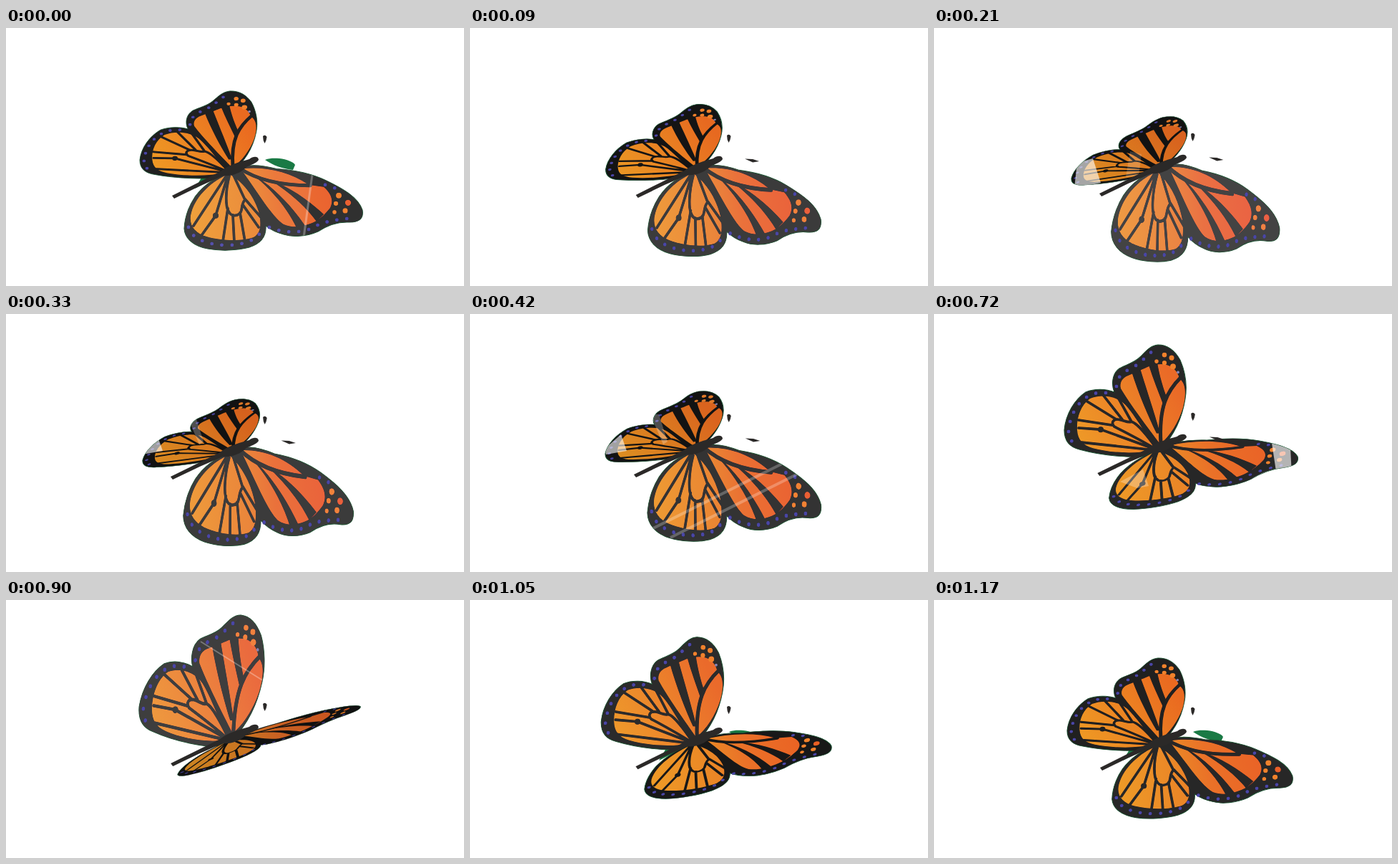
Animation of 640 by 360 pixels, one loop 1200 ms. Source, as an HTML page:

```html
<!DOCTYPE html>
<html lang="en">
<head>
<meta charset="utf-8">
<title>Butterfly</title>
<style>
  html, body { margin: 0; width: 100%; height: 100%; overflow: hidden; background: #fff; }
  svg { display: block; width: 100vw; height: 100vh; }
  .edge { fill: #141413; stroke: #14502f; stroke-width: 1; }
  .vein { fill: none; stroke: #141413; stroke-width: 3.6; stroke-linecap: round; stroke-linejoin: round; }
  .thick { stroke-width: 5; }
  .wedge { fill: #141413; }
  .dots { fill: none; stroke: #4a46a6; stroke-width: 5; stroke-linecap: round; stroke-dasharray: 0 14; }
  .spots { fill: #f0822c; }
  .sheen { mix-blend-mode: lighten; }
  .glints path { fill: #fff; }
  .glints .line { fill: none; stroke: #fff; }
</style>
</head>
<body>
<svg viewBox="0 0 640 360">
  <defs>
    <linearGradient id="warmR" gradientUnits="userSpaceOnUse" x1="260" y1="270" x2="450" y2="240">
      <stop offset="0" stop-color="#ee9a26"/>
      <stop offset=".45" stop-color="#ea8526"/>
      <stop offset=".65" stop-color="#ea7128"/>
      <stop offset="1" stop-color="#ea6424"/>
    </linearGradient>
    <linearGradient id="warmL" gradientUnits="userSpaceOnUse" x1="200" y1="165" x2="335" y2="95">
      <stop offset="0" stop-color="#ee9824"/>
      <stop offset=".5" stop-color="#ec8322"/>
      <stop offset="1" stop-color="#ea6a20"/>
    </linearGradient>
    <path id="shapeL" d="M318 187C332 172 346 150 351 118C354 100 351 80 344 64C336 50 326 43 313 43C302 44 296 52 288 60C280 68 268 71 259 76C248 84 248 100 252 109C240 104 224 104 212 109C196 120 184 140 182 162C182 178 190 186 204 189C230 196 260 199 286 199C300 198 310 193 318 187Z"/>
    <path id="shapeR" d="M312 203C330 190 350 190 378 197C410 199 432 206 447 213C470 224 492 236 498 254C500 266 494 271 480 271C462 270 448 276 436 284C420 291 400 292 388 288C376 285 368 280 363 276C364 290 358 300 340 306C322 311 298 311 282 308C262 304 250 294 249 280C250 262 256 248 264 236C276 220 290 210 312 203Z"/>
    <clipPath id="clipL"><use href="#shapeL" class="moveL"/></clipPath>
    <clipPath id="clipR"><use href="#shapeR" class="moveR"/></clipPath>
  </defs>

  <g id="fringe" fill="#1a7a45">
    <path d="M362 184C370 181 376 182 382 182C392 183 402 187 404 191L401 198C385 196 374 192 362 184Z"/>
    <path d="M264 224L273 209L306 203Z"/>
  </g>

  <g class="moveL">
    <use href="#shapeL" class="edge"/>
    <g fill="url(#warmL)">
      <path d="M316 181C300 160 274 126 261 104C259 96 263 89 271 86C282 81 292 77 298 74C308 70 318 69 326 71C337 74 342 84 343 90C352 96 353 112 348 130C342 150 330 170 316 181Z"/>
      <path d="M310 189C298 170 280 140 268 127C254 113 232 112 218 118C204 128 199 146 200 162C201 176 208 183 222 187C245 193 280 196 310 189Z"/>
    </g>
    <path class="wedge" d="M276 80L288 76C298 108 310 144 316 166L311 166C300 144 286 112 276 80ZM300 71L312 68C315 86 321 106 326 118L321 128C314 110 306 90 300 71Z"/>
    <path class="vein thick" d="M345 88C325 108 314 130 317 180"/>
    <path class="vein" d="M308 187C290 176 262 162 252 157C247 152 250 146 258 147C266 148 270 152 276 150C284 152 300 172 310 186M250 155L202 148M255 147L214 122M263 147L237 114M276 150L258 118M306 187L233 161L202 159M304 189L206 179"/>
    <circle cx="233" cy="161" r="4" fill="#141413"/>
    <path class="dots" d="M240 110C214 106 190 130 188 165Q190 178 199 184"/>
    <path class="dots" d="M255 101C256 84 268 80 280 73C294 66 298 52 314 49"/>
    <g class="spots">
      <circle cx="322" cy="57" r="3.4"/><circle cx="311" cy="66" r="2.8"/>
      <circle cx="322" cy="68" r="3.2"/><circle cx="334" cy="73" r="4"/>
      <circle cx="332" cy="61" r="3.6"/><circle cx="341" cy="81" r="2" fill="#8884b4"/>
    </g>
    <use href="#shapeL" class="sheen"/>
    <use href="#shapeL" class="shade"/>
  </g>

  <g class="moveR">
    <use href="#shapeR" class="edge"/>
    <g fill="url(#warmR)">
      <path d="M328 197C360 193 395 200 423 219L444 222C455 232 458 241 453 251C446 260 438 268 428 272C416 277 402 280 388 274C372 264 352 230 328 197Z"/>
      <path d="M312 204C286 214 262 238 258 262C256 276 264 286 280 291C300 297 330 298 346 292C357 286 357 272 353 256C347 238 335 218 312 204Z"/>
    </g>
    <path class="wedge" d="M342 203C372 220 398 247 418 276L407 281C394 252 368 222 342 203ZM368 212C400 224 424 242 444 260L434 270C418 248 394 228 368 212Z"/>
    <path class="vein thick" d="M326 196C350 212 385 220 425 220"/>
    <path class="vein" d="M309 205L262 276M310 206L293 262L272 291M312 207C306 230 307 250 311 256C314 262 320 264 327 259C331 254 328 246 334 240L318 206M310 252L303 298M317 261L319 299M327 258L334 298M331 247L353 278M334 239L356 264"/>
    <circle cx="293" cy="262" r="4" fill="#141413"/>
    <path class="dots" d="M255 278C258 292 278 302 306 303C332 303 352 296 357 282"/>
    <path class="dots" d="M368 278C390 287 414 286 430 278C446 268 466 268 489 264"/>
    <path class="dots" d="M446 219L461 224"/>
    <g class="spots">
      <circle cx="465" cy="234" r="4"/><circle cx="478" cy="244" r="4.2" fill="#ea6024"/>
      <circle cx="461" cy="245" r="3.2"/><circle cx="474" cy="255" r="3.6"/>
      <circle cx="459" cy="257" r="2.8"/>
    </g>
    <use href="#shapeR" class="sheen"/>
    <use href="#shapeR" class="shade"/>
  </g>

  <g class="glints" clip-path="url(#clipL)">
    <path data-on="150 330" opacity=".62" d="M200 188L222 182L233 216L196 224Z"/>
    <path data-on="150 330" opacity=".16" d="M274 172L290 176L286 206L268 208Z"/>
    <path data-on="330 480" opacity=".6" d="M188 188L211 168L219 191L190 196Z"/>
    <path data-on="330 480" opacity=".25" d="M252 140L264 140L276 178L270 182Z"/>
    <path data-on="840 960" opacity=".3" class="line" stroke-width="2" d="M272 58L360 113"/>
  </g>
  <g class="glints" clip-path="url(#clipR)">
    <path data-on="0 90" opacity=".28" class="line" stroke-width="3" d="M428 205L416 292"/>
    <path data-on="0 90" opacity=".06" d="M240 180H430L416 320H240Z"/>
    <path data-on="360 480" opacity=".25" class="line" stroke-width="4" d="M250 302L440 207M280 312L460 222"/>
    <path data-on="510 600" opacity=".25" class="line" stroke-width="4" d="M406 186L394 284"/>
    <path data-on="660 780" opacity=".65" d="M472 180L498 186L500 226L479 226Z"/>
    <path data-on="660 780" opacity=".28" d="M260 234L292 217L300 240L284 243Z"/>
  </g>

  <g id="body" fill="#2b2928">
    <path d="M232 234L268 216L300 200C312 190 330 186 340 183C346 178 353 179 353 184C350 189 342 191 336 194C328 203 314 207 304 206L272 220L235 238Z"/>
    <path d="M359 151Q362 148 364.500 152Q364 157 361.500 161Q359 157 359 151Z"/>
    <path id="feeler" d="M384 183.500L395 184L404 187L395 188.500Z"/>
  </g>
</svg>
<script>
const LOOP = 1200, STEP = 30;

// time, tail y, left tip, left hind, right tip, right hind, left light, right light
const poses = [
  [0,    236, 313, 88,    187, 185, 497, 266, 255, 299, .05,  .12],
  [210,  233, 320, 124.5, 192, 210, 481, 293, 252, 307, -.08, .2],
  [420,  226, 319, 108,   189, 195, 489, 280, 253, 300, -.07, .13],
  [540,  223, 313, 80,    185, 178, 501, 254, 254, 288, .01,  .11],
  [720,  224, 313, 43,    182, 163, 507, 208, 251, 270, .08,  .08],
  [900,  230, 328, 21,    186, 150, 493, 153, 244, 247, .18,  -.14],
  [1080, 235, 315, 59,    183, 175, 505, 225, 251, 282, .08,  .05],
  [1170, 236, 313, 81,    186, 183, 500, 257, 255, 296, .05,  .08]
];

const $ = s => document.querySelector(s);
const $$ = s => [...document.querySelectorAll(s)];

// Rest triangles: root, tip, hind corner
const wing = (side, rest) => ({
  rest,
  parts: $$('.move' + side),
  sheen: $(`.move${side} .sheen`),
  shade: $(`.move${side} .shade`)
});
const left = wing('L', [318, 187, 313, 43, 182, 163]);
const right = wing('R', [318, 200, 497, 266, 255, 299]);
const glints = $$('[data-on]').map(el => ({ el, span: el.dataset.on.split(' ').map(Number) }));

function poseAt(i) {
  const n = poses.length, turn = Math.floor(i / n);
  const [t, ...values] = poses[i - turn * n];
  return { t: t + turn * LOOP, values };
}

// Smooth periodic curve through the poses
function sample(t) {
  let i = poses.length - 1;
  while (poses[i][0] > t) i--;
  const [a, b, c, d] = [-1, 0, 1, 2].map(k => poseAt(i + k));
  const h = c.t - b.t, u = (t - b.t) / h, u2 = u * u, u3 = u2 * u;
  return b.values.map((p, k) => {
    const q = c.values[k];
    const m = (q - a.values[k]) / (c.t - a.t) * h;
    const n = (d.values[k] - p) / (d.t - b.t) * h;
    return (2 * u3 - 3 * u2 + 1) * p + (u3 - 2 * u2 + u) * m + (3 * u2 - 2 * u3) * q + (u3 - u2) * n;
  });
}

// Affine map that takes one triangle to another
function matrix(from, to) {
  const sides = ([x, y, tx, ty, hx, hy]) => [tx - x, ty - y, hx - x, hy - y];
  const [p, q, r, s] = sides(from), [P, Q, R, S] = sides(to);
  const det = p * s - q * r;
  const a = (P * s - R * q) / det, b = (Q * s - S * q) / det;
  const c = (R * p - P * r) / det, d = (S * p - Q * r) / det;
  const e = to[0] - a * from[0] - c * from[1];
  const f = to[1] - b * from[0] - d * from[1];
  return `matrix(${[a, b, c, d, e, f].map(v => v.toFixed(5)).join(' ')})`;
}

// Positive light lifts the blacks, negative light dims the whole wing
function setWing({ rest, parts, sheen, shade }, points, light) {
  const m = matrix(rest, points);
  parts.forEach(el => el.setAttribute('transform', m));
  const grey = Math.round(20 + 235 * Math.max(0, light));
  sheen.setAttribute('fill', `rgb(${grey},${grey},${grey})`);
  shade.setAttribute('opacity', Math.max(0, -light).toFixed(3));
}

const show = (el, on) => el.setAttribute('visibility', on ? 'visible' : 'hidden');

function draw(t) {
  const [tail, ...v] = sample(t);
  const root = [318, tail - 36.5];
  const lift = 236 - tail;
  setWing(left, [...root, ...v.slice(0, 4)], v[8]);
  setWing(right, [...root, ...v.slice(4, 8)], v[9]);
  $('#body').setAttribute('transform',
    `translate(353 ${-lift.toFixed(2)}) scale(${1 + lift * .0025} 1) translate(-353 0)`);
  show($('#fringe'), t < 90 || t >= 1050);
  show($('#feeler'), t >= 90 && t < 840);
  glints.forEach(({ el, span }) => show(el, t >= span[0] && t < span[1]));
}

const start = performance.now();
function tick() {
  const t = performance.now() - start;
  draw(Math.floor(t / STEP) * STEP % LOOP);
  requestAnimationFrame(tick);
}
tick();
</script>
</body>
</html>
```
